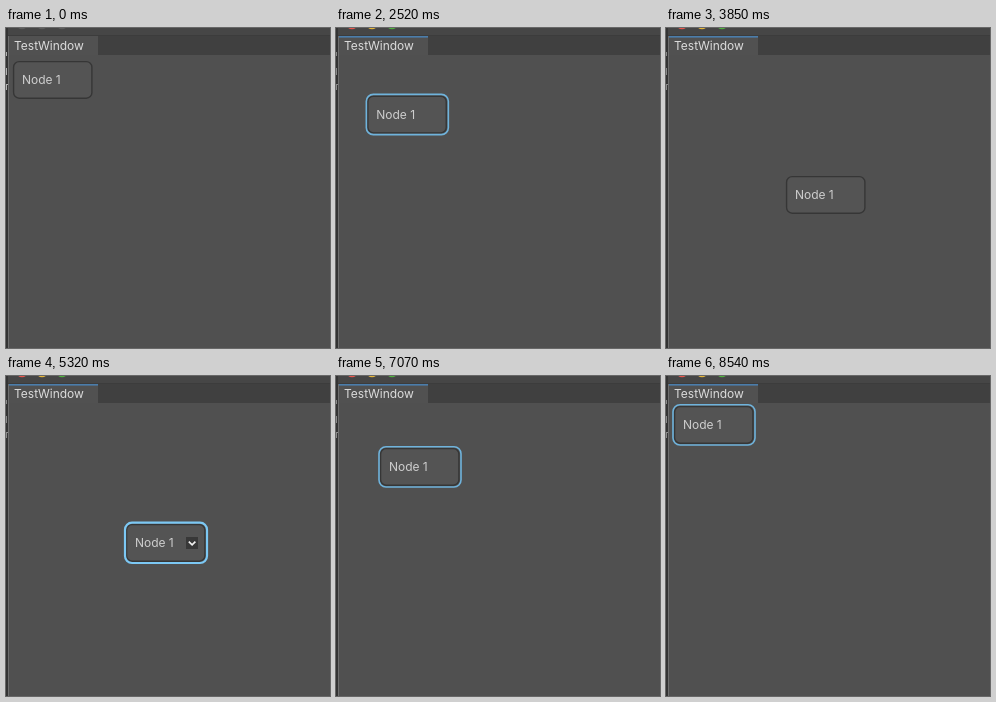
Recreate the animation shown at these times as an HTML page with a canvas. Size 324x320 px, loop 8680 ms.

```html
<!DOCTYPE html>
<html lang="en">
<head>
<meta charset="utf-8">
<title>Node window</title>
<style>
  html, body { margin: 0; width: 100%; height: 100%; overflow: hidden; background: #505050; }
  canvas { display: block; }
</style>
</head>
<body>
<canvas id="stage" width="324" height="320"></canvas>
<script>
const ctx = document.getElementById('stage').getContext('2d');
const LOOP = 8680, STEP = 70;
const FONT = 'Inter, "Open Sans", sans-serif';

// Drag paths as [time, x, y] of the outline's top left corner
const dragOut = [[2310, 5, 31], [2870, 96, 143], [3220, 118, 146]];
const dragBack = [
  [5600, 118, 146], [6160, 58, 119], [6510, 57.5, 98], [7070, 42, 70],
  [7420, 27, 55], [8190, 5.5, 26.5], [8330, 6, 28]
];

const clamp = (v, lo, hi) => Math.min(hi, Math.max(lo, v));
const between = (t, a, b) => t >= a && t < b;

// Monotone cubic through the path points, at rest at both ends
function along(path, t, axis) {
  const last = path.length - 1;
  t = clamp(t, path[0][0], path[last][0]);
  const slope = i => (path[i + 1][axis] - path[i][axis]) / (path[i + 1][0] - path[i][0]);
  const tangent = i => {
    if (i === 0 || i === last) return 0;
    const a = slope(i - 1), b = slope(i);
    return a * b > 0 ? 2 * a * b / (a + b) : 0;
  };
  let i = 0;
  while (i < last - 1 && t > path[i + 1][0]) i++;
  const span = path[i + 1][0] - path[i][0];
  const u = (t - path[i][0]) / span, v = 1 - u;
  return path[i][axis] * v * v * (1 + 2 * u) + path[i + 1][axis] * u * u * (3 - 2 * u)
    + span * u * v * (tangent(i) * v - tangent(i + 1) * u);
}

function rect(x, y, w, h, color) {
  ctx.fillStyle = color;
  ctx.fillRect(x, y, w, h);
}

function roundBox(x, y, w, h, r, line, width, fill) {
  ctx.beginPath();
  ctx.roundRect(x, y, w, h, r);
  if (fill) {
    ctx.fillStyle = fill;
    ctx.fill();
  }
  ctx.strokeStyle = line;
  ctx.lineWidth = width;
  ctx.stroke();
}

function label(text, x, y, color) {
  ctx.font = `12px ${FONT}`;
  ctx.fillStyle = color;
  ctx.fillText(text, x, y);
}

function drawWindow(focused) {
  rect(0, 0, 324, 320, '#505050');
  rect(0, 0, 324, 8, '#464646');
  rect(0, 7, 324, 1, '#3c3c3c');
  rect(0, 8, 324, 19, '#404040');
  rect(2, 8, 90, 19, '#515151');
  const lights = focused ? ['#e8574e', '#e5b53a', '#4fb13f'] : ['#5c5c5c', '#5c5c5c', '#5c5c5c'];
  lights.forEach((color, i) => {
    ctx.beginPath();
    ctx.arc(16 + i * 20, -4.9, 6.2, 0, Math.PI * 2);
    ctx.fillStyle = color;
    ctx.fill();
  });
  if (focused) rect(2, 8, 90, 1.6, '#4b7dab');
  label('TestWindow', 8, 22.4, '#dcdcdc');

  // Sliver of the window behind
  rect(0, 0, 2, 320, '#343434');
  rect(2, 8, 1, 312, '#6e6e6e');
  const ink = focused ? '#8c8c8c' : '#b4b4b4';
  rect(0, 24, 1, 4, ink);
  rect(0, 40, 1, 7, ink);
  rect(0, 56, 2, 1, ink);
  rect(0, 57, 1, 5, ink);
}

function drawChevron(x, y) {
  rect(x, y, 12, 12, '#383838');
  ctx.beginPath();
  ctx.moveTo(x + 2.8, y + 4.6);
  ctx.lineTo(x + 6.1, y + 7.8);
  ctx.lineTo(x + 9.4, y + 4.6);
  ctx.strokeStyle = '#f0f0f0';
  ctx.lineWidth = 1.7;
  ctx.stroke();
}

function drawNode(x, y, selected, hot) {
  roundBox(x + 2.6, y + 2.6, 78.3, 36.6, 5.5, '#363636', 1.4, '#545454');
  if (selected) {
    roundBox(x + 1, y + 0.7, 82, 40.3, 7, hot ? '#7cc8f4' : '#6fb3dc', hot ? 2.2 : 1.6);
  }
  label('Node 1', x + 10.9, y + 25.2, '#cecece');
  if (hot) drawChevron(x + 62, y + 15);
}

function drawMarquee(t) {
  const u = clamp((t - 4340) / 560, 0, 1);
  const k = u * u * (3 - 2 * u);
  ctx.setLineDash([5, 5]);
  ctx.strokeStyle = '#d98a1c';
  ctx.lineWidth = 1;
  ctx.strokeRect(66.5, 100.5, 187 * k, 136 * k);
  ctx.setLineDash([]);
}

function draw(time) {
  const t = Math.floor((time % LOOP) / STEP) * STEP;
  const path = t < 5000 ? dragOut : dragBack;
  const selected = between(t, 1820, 3850) || t >= 4970;
  const hot = between(t, 3500, 3850) || between(t, 5320, 5530);
  drawWindow(t >= 420);
  drawNode(along(path, t, 1), along(path, t, 2), selected, hot);
  if (between(t, 4410, 4970)) drawMarquee(t);
}

const start = performance.now();
function tick() {
  draw(performance.now() - start);
  requestAnimationFrame(tick);
}
tick();
</script>
</body>
</html>
```
